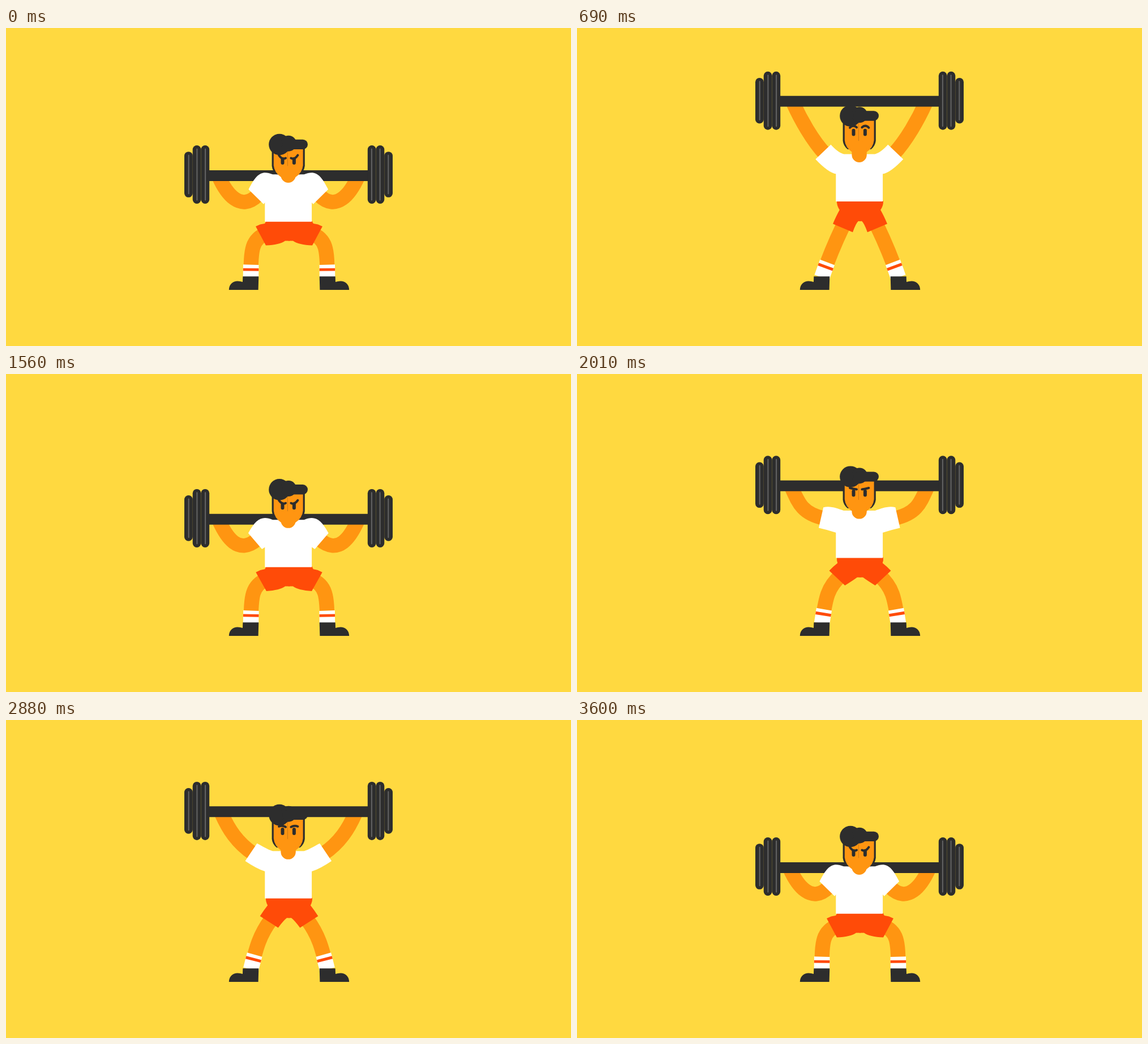
These frames come from a looping animation (998x561 px, 3.63 s). An HTML page with a canvas:

```html
<!DOCTYPE html>
<html lang="en">
<head>
<meta charset="utf-8">
<title>Barbell press</title>
<style>
  html, body { margin: 0; width: 100%; height: 100%; overflow: hidden; background: #ffd940; }
  canvas { display: block; }
</style>
</head>
<body>
<canvas id="stage" width="998" height="561"></canvas>
<script>
const ctx = document.getElementById('stage').getContext('2d');
const BG = '#ffd940', DARK = '#2d2d2d', SKIN = '#ff9511', RED = '#ff4b08', LINE = '#606060';
const LOOP = 3630, REP = 1800, STEP = 30;

// cubic-bezier(x1, 0, x2, 1)
function ease(x, x1, x2) {
  let lo = 0, hi = 1;
  for (let i = 0; i < 30; i++) {
    const s = (lo + hi) / 2, r = 1 - s;
    if (3 * x1 * s * r * r + 3 * x2 * s * s * r + s * s * s < x) lo = s; else hi = s;
  }
  return lo * lo * (3 - 2 * lo);
}

// 0 in the squat, 1 with the bar fully up
function progress(t) {
  const x = t / (REP / 2);
  return x < 1 ? ease(x, 0.26, 0.06) : 1 - ease(x - 1, 0.35, 0.026);
}

function fill(color, build) {
  ctx.fillStyle = color;
  ctx.beginPath();
  build();
  ctx.fill();
}

function stroke(color, width, build, cap = 'butt') {
  ctx.strokeStyle = color;
  ctx.lineWidth = width;
  ctx.lineCap = cap;
  ctx.beginPath();
  build();
  ctx.stroke();
}

// Draws the left half, then its mirror image; sum = left x + right x
function both(sum, draw) {
  draw();
  ctx.save();
  ctx.translate(sum, 0);
  ctx.scale(-1, 1);
  draw();
  ctx.restore();
}

const polar = ([x, y], angle, r) => [x + r * Math.cos(angle), y + r * Math.sin(angle)];

// A bent limb that leaves each joint at a given angle
function limb(a, angleA, reachA, b, angleB, reachB) {
  ctx.moveTo(...a);
  ctx.bezierCurveTo(...polar(a, angleA, reachA), ...polar(b, angleB, reachB), ...b);
}

function drawBar(y, p) {
  fill(DARK, () => ctx.rect(350, y - 7.5 - p, 298, 19));
  both(998, () => {
    for (let i = 0; i < 3; i++) {
      const x = 351.8 - 14.7 * i, h = i < 2 ? 51.5 : 40.3;
      fill(DARK, () => ctx.roundRect(x - 7.4, y - h, 14.8, h * 2, 7.4));
      stroke(LINE, 2.2, () => {
        ctx.moveTo(x + 0.3, y - h + 6.5);
        ctx.lineTo(x + 0.3, y + h - 6.5);
      }, 'round');
    }
  });
}

function drawLeg(p) {
  const sock = 22 + 6.5 * p;
  const path = () => limb(
    [432.5, 440], 0.34 * p - Math.PI / 2, 50 - 20 * p,
    [462 + 8 * p, 362 - 13 * p], 2.8 - 0.8 * p, 30 + 8 * p);
  stroke(SKIN, 26, path);
  ctx.setLineDash([sock, 999]);
  stroke('#fff', 27.5, path);
  ctx.setLineDash([0, sock - 11, 5, 999]);
  stroke(RED, 27.5, path);
  ctx.setLineDash([]);
  fill(DARK, () => {
    ctx.moveTo(393.8, 462);
    ctx.bezierCurveTo(394, 452, 401, 446.5, 409, 446.5);
    ctx.quadraticCurveTo(414, 446.5, 418, 448);
    ctx.lineTo(418.3, 438.3);
    ctx.lineTo(446.3, 438.3);
    ctx.lineTo(445.6, 462);
  });
}

function drawShorts(waist, p) {
  const hem = [450 + 20 * p, waist + 25 + 22.5 * p], tilt = 1.08 - 0.7 * p;
  const crotch = waist + 33.8 + p;
  fill(RED, () => {
    ctx.moveTo(501, waist - 1);
    ctx.lineTo(459, waist - 1);
    ctx.quadraticCurveTo(458.5, waist + 2 + 5 * p, 457 + 7 * p, waist + 3.3 + 12 * p);
    ctx.quadraticCurveTo(449 + 9 * p, waist + 4 + 22 * p, ...polar(hem, tilt, -19));
    ctx.lineTo(...polar(hem, tilt, 19));
    ctx.quadraticCurveTo(483 + 10 * p, waist + 41 - 3 * p, 493 + 4 * p, crotch);
    ctx.lineTo(501, crotch);
  });
}

// Arms turn about the shoulder; the cuff lies square to the upper arm
function armPose(neck, p) {
  const tilt = 0.78 + 2.63 * p - 1.01 * p * p, out = tilt + Math.PI / 2;
  return { tilt, out, cuff: polar([460 - 7.5 * p, neck + 21 - 6 * p], out, 26) };
}

function drawArm({ cuff, out }, barY, p) {
  stroke(SKIN, 25.5, () => limb(
    [376 + 6 * p, barY + 4], 1.15, 31,
    polar(cuff, out, -5), out, 45 - 13 * p));
}

function drawSleeve({ cuff, tilt, out }, neck, p) {
  const top = polar(cuff, tilt, -18.6), low = polar(cuff, tilt, 18.6);
  const shrug = (1 - p) ** 2, [x, y] = polar(top, out, -11);
  const armpit = neck + 35 + 14 * shrug;
  fill('#fff', () => {
    ctx.moveTo(471, neck);
    ctx.bezierCurveTo(463 - 11 * shrug, neck - 2 - 6 * shrug, x + 6 * shrug, y - 20 * shrug, ...top);
    ctx.lineTo(...low);
    ctx.quadraticCurveTo(...polar(low, out, -34 * p), 458, armpit);
    ctx.lineTo(475, armpit);
  });
}

function drawHead(neck, p) {
  const y = 205.5 - 51.7 * p, jaw = neck + 5 - 8.5 * p;
  both(997.4, () => {
    fill(DARK, () => {
      ctx.moveTo(500, y);
      ctx.lineTo(469.6, y);
      ctx.lineTo(469.6, jaw - 20);
      ctx.quadraticCurveTo(470.5, jaw - 11, 478, jaw - 5);
      ctx.lineTo(500, jaw - 5);
    });
    fill(SKIN, () => {
      ctx.moveTo(500, y);
      ctx.lineTo(472.8, y);
      ctx.lineTo(472.8, jaw - 21);
      ctx.quadraticCurveTo(474, jaw - 8, 486, jaw);
      ctx.lineTo(500, jaw);
    });
  });
  fill(SKIN, () => ctx.roundRect(485.4, jaw - 20, 26.4, neck + 34.6 - jaw, 13.2));

  fill(DARK, () => ctx.arc(483, y, 18.8, 0, 7));
  fill(DARK, () => ctx.arc(499, y - 1.8, 14, 0, 7));
  fill(DARK, () => ctx.roundRect(488, y - 8.8, 45, 17.4, 8.7));

  both(997.4, () => {
    fill(DARK, () => ctx.roundRect(485.5, y + 22.6, 6, 12.8, 3));
    stroke(DARK, 4, () => {
      ctx.moveTo(482, y + 18.8 + 2 * p);
      ctx.quadraticCurveTo(488, y + 27.5 - 13 * p, 494, y + 24 - 3.8 * p);
    }, 'round');
  });
}

function draw(p) {
  const waist = 341.8 - 36.8 * p, neck = waist - 83.5, barY = 258.5 - 133.5 * p;
  const arm = armPose(neck, p);
  ctx.fillStyle = BG;
  ctx.fillRect(0, 0, 998, 561);
  both(997.6, () => drawArm(arm, barY, p));
  drawBar(barY, p);
  both(1000, () => drawLeg(p));
  both(1000, () => drawShorts(waist, p));
  fill('#fff', () => ctx.rect(457.3, neck + 20, 82.8, waist - neck - 20));
  fill('#fff', () => ctx.rect(468, neck, 61, 30));
  both(997.6, () => drawSleeve(arm, neck, p));
  drawHead(neck, p);
}

const start = performance.now();
function tick() {
  const t = (performance.now() - start) % LOOP;
  draw(progress(Math.floor(t / STEP) * STEP % REP));
  requestAnimationFrame(tick);
}
tick();
</script>
</body>
</html>
```
